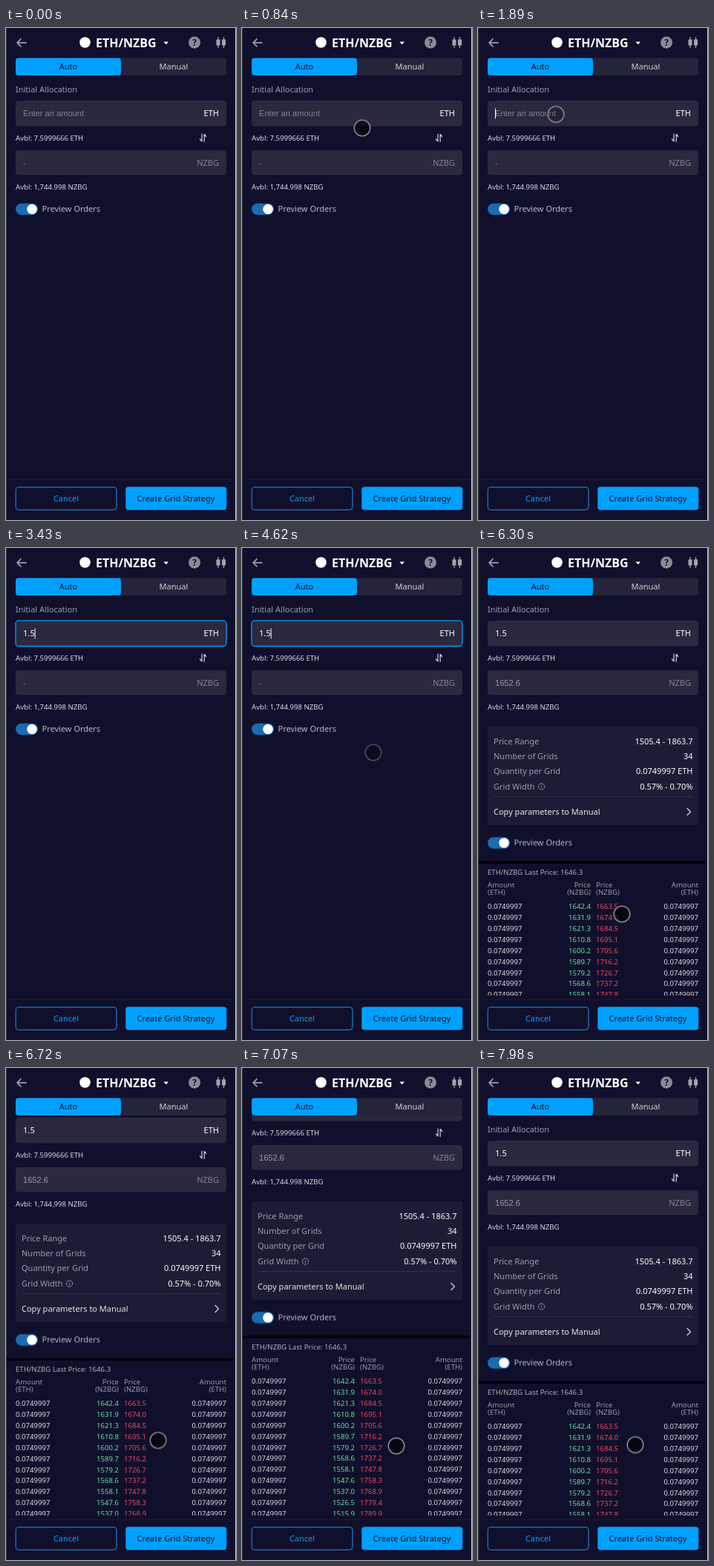
An HTML page for the animation above (8 s loop, 310 px wide and 664 px high).

```html
<!DOCTYPE html>
<html lang="en">
<head>
<meta charset="utf-8">
<title>Grid strategy form</title>
<style>
  html, body { margin: 0; width: 100%; height: 100%; overflow: hidden; background: #11102c; }
  svg { display: block; width: 310px; height: 664px; }
  text { font: 11px "Noto Sans", "Open Sans", sans-serif; fill: #fff; white-space: pre; }
  .title { font-size: 16px; font-weight: 600; }
  .s { font-size: 9.6px; fill: #dcdce3; }
  .input { font: 11.1px "Liberation Sans", Arial, sans-serif; }
  .typed { font-weight: 500; }
  .g { fill: #9c9ca8; }
  .dim { fill: #84848f; }
  .e { text-anchor: end; }
  .m { text-anchor: middle; }
  .dark { fill: #0b1230; }
  .blue { fill: #00a0ff; }
  .buy { fill: #5fe6a0; }
  .sell { fill: #f0475f; }
  .field { fill: #2a293f; }
  .line { fill: none; stroke-linecap: round; stroke-linejoin: round; }

  /* One loop is 8 s, so 1% is 80 ms. */
  .t { animation: 8s step-end infinite; }
  .hint { animation-name: hint; }
  .d1 { animation-name: d1; }
  .d2 { animation-name: d2; }
  .d3 { animation-name: d3; }
  .empty { animation-name: empty; }
  .filled { animation-name: filled; }
  .toggle { animation-name: drop; }
  .caret { animation-name: caret; }
  .focus { animation: focus 8s linear infinite; }
  .fade { animation: fade 8s linear infinite; }
  .scroll { animation: scroll 8s linear infinite; }
  .show { animation: show 8s linear infinite; }
  .move { animation: move 8s linear infinite, press 8s linear infinite; }

  @keyframes hint { 0% { opacity: 1 } 29.75%, 100% { opacity: 0 } }
  @keyframes d1 { 0% { opacity: 0 } 29.75%, 100% { opacity: 1 } }
  @keyframes d2 { 0% { opacity: 0 } 36.75%, 100% { opacity: 1 } }
  @keyframes d3 { 0% { opacity: 0 } 42.875%, 100% { opacity: 1 } }
  @keyframes empty { 0% { opacity: 1 } 63%, 100% { opacity: 0 } }
  @keyframes filled { 0% { opacity: 0 } 63%, 100% { opacity: 1 } }
  @keyframes drop { 0% { transform: none } 63%, 100% { transform: translateY(153.5px) } }
  @keyframes caret {
    0% { opacity: 0; transform: none }
    23.625% { opacity: 1; transform: none }
    29.75% { opacity: 1; transform: translateX(6.4px) }
    36.75% { opacity: 1; transform: translateX(9.4px) }
    42.875% { opacity: 1; transform: translateX(15.6px) }
    49.875% { opacity: 0; transform: translateX(15.6px) }
    56% { opacity: 1; transform: translateX(15.6px) }
    62.125%, 100% { opacity: 0; transform: translateX(15.6px) }
  }
  @keyframes focus { 0%, 23.625% { opacity: 0 } 28%, 62.9% { opacity: 1 } 65.6%, 100% { opacity: 0 } }
  @keyframes fade { 0%, 62.2% { opacity: 0 } 65.6%, 100% { opacity: 1 } }
  @keyframes scroll {
    0%, 79.6% { transform: none }
    84% { transform: translateY(-31px) }
    86.6%, 87.5% { transform: translateY(-50px) }
    88.375% { transform: translateY(-61px) }
    90.125%, 94.5% { transform: translateY(-70px) }
    98%, 100% { transform: none }
  }
  @keyframes show {
    0%, .87% { opacity: 0 }
    .875%, 29.74% { opacity: 1 }
    29.75%, 54.5% { opacity: 0 }
    61.25%, 100% { opacity: 1 }
  }
  @keyframes press { 0%, 18.4% { fill-opacity: .6 } 20.125%, 29.75% { fill-opacity: .15 } 29.76%, 100% { fill-opacity: .6 } }
  @keyframes move {
    0%, .875% { transform: translate(212px, 617px); animation-timing-function: ease-in-out }
    10.5% { transform: translate(162px, 135px); animation-timing-function: ease-out }
    14%, 18.4% { transform: translate(156px, 123px) }
    20.125%, 29.75% { transform: translate(105px, 116.5px); animation-timing-function: step-end }
    29.76%, 70.9% { transform: translate(177px, 276px); animation-timing-function: ease-in }
    73.5% { transform: translate(166px, 328px) }
    76.2% { transform: translate(172px, 425px); animation-timing-function: ease-out }
    78.75%, 79.6% { transform: translate(194px, 494px) }
    84% { transform: translate(205px, 502.5px) }
    86.6% { transform: translate(208px, 509px) }
    88.375% { transform: translate(208px, 510px) }
    91.875%, 94.5% { transform: translate(209px, 511px) }
    98%, 100% { transform: translate(212px, 508.5px) }
  }
</style>
</head>
<body>
<svg viewBox="0 0 310 664">
  <clipPath id="view"><rect y="64" width="310" height="539.5"/></clipPath>
  <rect width="310" height="664" fill="#11102c"/>

  <g clip-path="url(#view)">
    <g class="scroll">
      <text class="g" x="13" y="87">Initial Allocation</text>
      <rect class="field" x="13" y="98" width="284" height="34.5" rx="4"/>
      <rect class="focus" x="13" y="98.2" width="284" height="34.3" rx="4" fill="none" stroke="#00a0ff" stroke-width="1.3"/>
      <text class="input dim t hint" x="23" y="119">Enter an amount</text>
      <text class="typed t d1" x="23" y="119">1</text>
      <text class="typed t d2" x="29.3" y="119">.</text>
      <text class="typed t d3" x="32.4" y="119">5</text>
      <rect class="t caret" x="23" y="108.5" width="1" height="14" fill="#fff"/>
      <text class="e" x="287" y="119">ETH</text>
      <text class="s" x="13" y="152">Avbl: 7.5999666 ETH</text>
      <path class="line" d="M264 143v10l-2.6-3M267.2 153.5v-10l2.6 3" stroke="#d0d0d8" stroke-width="1.2"/>

      <rect class="field" x="13" y="165" width="284" height="33.5" rx="4"/>
      <text class="input dim t empty" x="23" y="185.5">-</text>
      <text class="input g t filled" x="23" y="185.5">1652.6</text>
      <text class="dim e" x="287" y="185.5">NZBG</text>
      <text class="s" x="13" y="217.5">Avbl: 1,744.998 NZBG</text>

      <g class="t toggle">
        <rect x="13" y="236.8" width="30" height="15.5" rx="7.75" fill="#1a6cb0"/>
        <circle cx="35" cy="244.5" r="6.8" fill="#fff"/>
        <text x="48.5" y="248" style="fill:#b9b9c4">Preview Orders</text>
      </g>

      <g class="fade">
        <rect x="13" y="241" width="284" height="133" rx="4" fill="#1d1c36"/>
        <g id="stats"></g>
        <g class="line" stroke="#9494a1" stroke-width=".9">
          <circle cx="85.5" cy="322" r="4.2"/>
          <path d="M85.5 321.5v2.5M85.5 319.7v.1"/>
        </g>
        <path d="M21 335.5H289" stroke="#34334b"/>
        <text x="21" y="360" style="fill:#e6e6ec">Copy parameters to Manual</text>
        <path class="line" d="M282 351.5l4.5 4.5-4.5 4.5" stroke="#d6d6de" stroke-width="1.2"/>
        <rect y="422" width="310" height="4" fill="#040410"/>
        <text class="s" x="13" y="440.5" style="fill:#b0b0bb">ETH/NZBG Last Price: 1646.3</text>
        <g id="table"></g>
      </g>
    </g>
  </g>

  <path class="line" d="M27 19.8H15M20 14.8l-5 5 5 5" stroke="#9a9aa8" stroke-width="1.7"/>
  <circle cx="106.5" cy="19.5" r="7.3" fill="#fff"/>
  <text class="title" x="121" y="25.5">ETH/NZBG</text>
  <path d="M212.5 18.5h6.5l-3.25 3.7z" fill="#fff"/>
  <circle cx="254" cy="19.5" r="8" fill="#8b8b96"/>
  <text class="m" x="254" y="23.8" style="font-size:12px;font-weight:700;fill:#11102c">?</text>
  <path d="M283.5 15.5h5v8h-5zM291 15.5h5v8h-5zM285.4 12h1.2v15h-1.2zM292.9 12h1.2v15h-1.2z" fill="#a3a3ae"/>

  <rect x="13" y="40.5" width="284" height="23.5" rx="4" fill="#25243a"/>
  <rect class="blue" x="13" y="40.5" width="142" height="23.5" rx="4"/>
  <text class="m dark" x="84" y="56">Auto</text>
  <text class="m" x="226" y="56" style="fill:#d0d0d8">Manual</text>

  <path d="M1 609.5H309" stroke="#1b1a36"/>
  <rect x="13.2" y="619.7" width="135.8" height="30.6" rx="4" fill="none" stroke="#1e93e6"/>
  <text class="m blue" x="81" y="638.5">Cancel</text>
  <rect class="blue" x="161.3" y="619.3" width="136" height="31.2" rx="4"/>
  <text class="m dark" x="229" y="638.5">Create Grid Strategy</text>
  <path d="M.5 0V664" stroke="#383844"/>
  <path d="M309.5 0V664" stroke="#c9c9cf"/>

  <g class="show">
    <circle class="move" r="10.8" fill="#000" stroke="#85858d" stroke-width="1.6"/>
  </g>
</svg>
<script>
  const text = (x, y, cls, str) => `<text x="${x}" y="${y}" class="${cls}">${str}</text>`;

  const stats = [
    [265, "Price Range", "1505.4 - 1863.7"],
    [285, "Number of Grids", "34"],
    [304.5, "Quantity per Grid", "0.0749997 ETH"],
    [326, "Grid Width", "0.57% - 0.70%"]
  ];
  document.getElementById("stats").innerHTML = stats.map(([y, label, value]) =>
    text(21, y, "g", label) + text(289.5, y, "e", value)).join("");

  const columns = [[13, "", "Amount", "ETH"], [152, "e", "Price", "NZBG"],
                   [159, "", "Price", "NZBG"], [297, "e", "Amount", "ETH"]];
  let table = columns.map(([x, side, name, unit]) =>
    text(x, 458, "s g " + side, name) + text(x, 467.5, "s g " + side, `(${unit})`)).join("");

  const amount = "0.0749997";
  for (let i = 0; i < 15; i++) {
    const y = 486.7 + 14.97 * i;
    table += text(13, y, "s", amount)
      + text(152, y, "s e buy", (1642.39 - 10.537 * i).toFixed(1))
      + text(159, y, "s sell", (1663.46 + 10.54 * i).toFixed(1))
      + text(297, y, "s e", amount);
  }
  document.getElementById("table").innerHTML = table;
</script>
</body>
</html>
```
